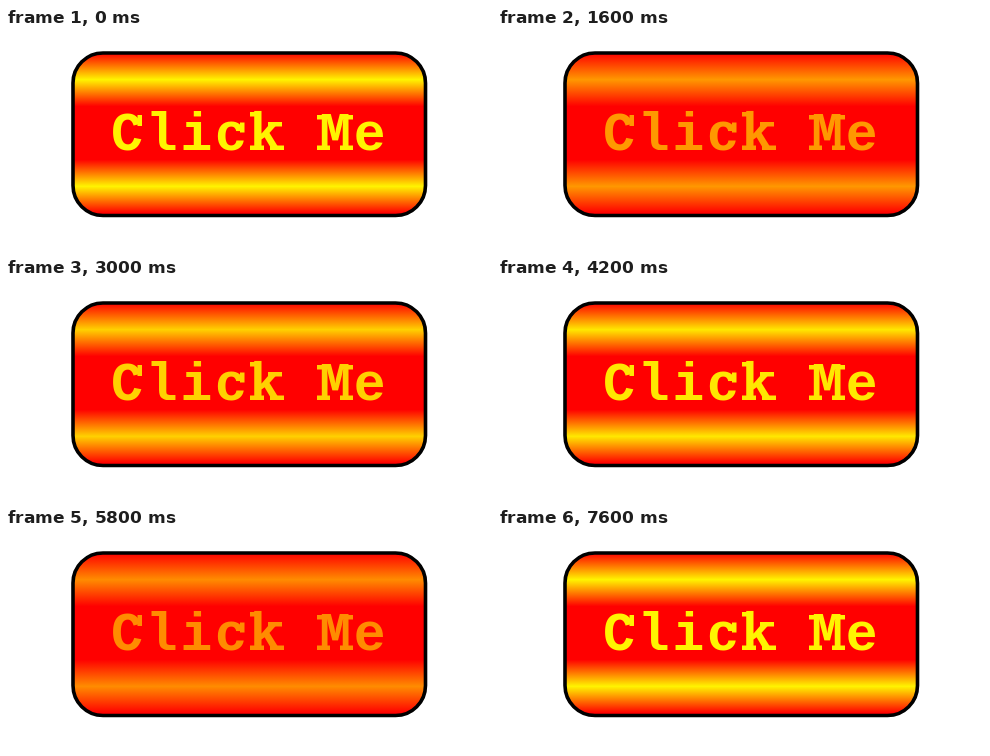
These frames come from a looping animation (486x222 px, 7800 ms). An HTML page:

```html
<!DOCTYPE html>
<html lang="en">
<head>
<meta charset="utf-8">
<title>Glowing button</title>
<style>
  html, body { margin: 0; width: 100%; height: 100%; overflow: hidden; background: #fff; }
  svg { display: block; width: 486px; height: 222px; color: #fff400; }
  .glow { stop-color: currentColor; }
  .label { fill: currentColor; }
  text { font: bold 53px "Liberation Mono", monospace; letter-spacing: 2.87px; white-space: pre; }
</style>
</head>
<body>
<svg id="stage" viewBox="0 0 486 222">
  <defs>
    <linearGradient id="bands" gradientUnits="userSpaceOnUse" x1="0" y1="25" x2="0" y2="185">
      <stop offset="0" stop-color="#f00"/>
      <stop offset=".1667" class="glow"/>
      <stop offset=".3333" stop-color="#f00"/>
      <stop offset=".6667" stop-color="#f00"/>
      <stop offset=".8333" class="glow"/>
      <stop offset="1" stop-color="#f00"/>
    </linearGradient>
  </defs>
  <rect x="67" y="25" width="352.5" height="162.5" rx="30" fill="url(#bands)" stroke="#000" stroke-width="3.6"/>
  <g class="label">
    <text x="105.1" y="122">Click Me</text>
    <!-- slab serifs on C, c, k and M -->
    <path d="M131.5 87h4.5v11h-4.5z M234 94.5h4.5v10h-4.5z
             M244 84h7v4.5h-7z M244 117.5h14v4.5h-14z M262 94h14v4.5h-14z M264 117.5h14v4.5h-14z
             M311 87h7v4.5h-7z M340 87h7v4.5h-7z M311 117.5h13v4.5h-13z M334 117.5h13v4.5h-13z"/>
  </g>
</svg>
<script>
  const STEP = 200, STEPS = 39, HALF = 10;
  const YELLOW = 255, ORANGE = 140;
  const stage = document.getElementById("stage");
  const start = performance.now();

  // Green channel swings linearly between yellow and dark orange.
  function draw(ms) {
    const step = Math.floor(ms / STEP) % STEPS + 1;
    const mix = 1 - Math.abs(step % (2 * HALF) - HALF) / HALF;
    const green = Math.round(YELLOW + (ORANGE - YELLOW) * mix);
    stage.style.color = `rgb(255, ${green}, 0)`;
  }

  function tick() {
    draw(Math.max(0, performance.now() - start));
    requestAnimationFrame(tick);
  }
  tick();
</script>
</body>
</html>
```
